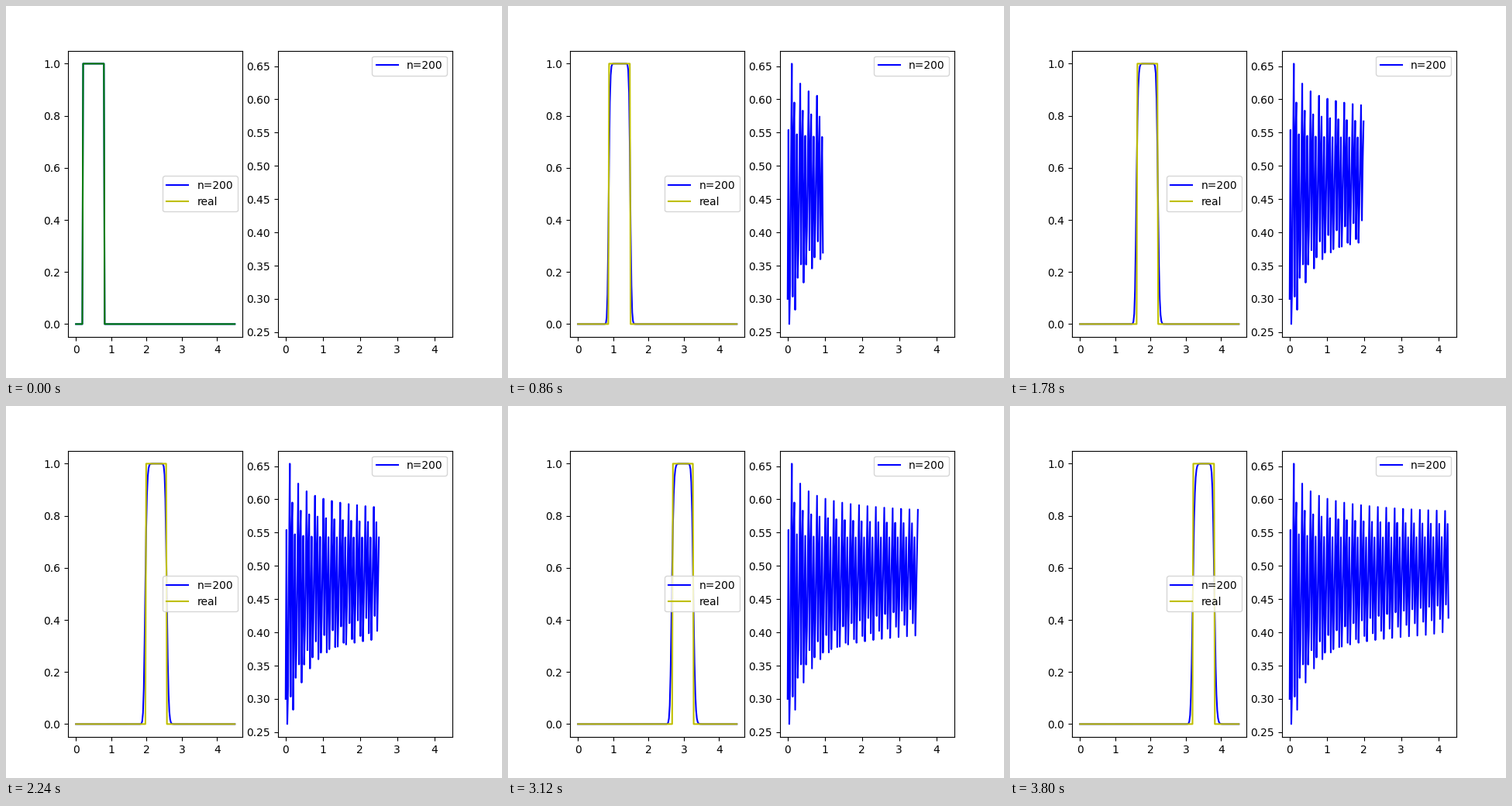
A matplotlib script that plays this animation: 640x480 px, repeating every 3.82 s.

```python
import numpy as np
import matplotlib.pyplot as plt
from matplotlib.animation import FuncAnimation

N = 200          # grid points
LENGTH = 4.5
CFL = 0.7
STEPS = 190

x = np.linspace(0, LENGTH, N)
dx = x[1] - x[0]


def pulse(step):
    """Exact square pulse after the given number of steps."""
    s = x - CFL * dx * step
    return np.where((s >= 0.2) & (s <= 0.8), 1.0, 0.0)


def advance(u):
    """One advection step, second order with the van Leer limiter."""
    d = np.diff(np.pad(u, 1, mode="edge"))
    back, ahead = d[:-1], d[1:]
    prod = back * ahead
    same_sign = prod > 0
    total = np.where(same_sign, back + ahead, 1.0)
    slope = np.where(same_sign, 2 * prod / total, 0.0)
    face = u + 0.5 * (1 - CFL) * slope
    new = u.copy()
    new[1:] -= CFL * np.diff(face)
    return new


states = [pulse(0)]
for _ in range(STEPS):
    states.append(advance(states[-1]))
error = np.array([np.abs(states[k] - pulse(k)).max()
                  for k in range(1, STEPS + 1)])
times = dx * np.arange(STEPS)

fig, (ax_wave, ax_err) = plt.subplots(1, 2, figsize=(6.4, 4.8), dpi=100)

wave, = ax_wave.plot(x, states[0], "b", label="n=200")
real, = ax_wave.plot(x, pulse(0), "y", label="real")
start, = ax_wave.plot(x, states[0], "g")
ax_wave.legend(loc="center right")

err, = ax_err.plot(times, error, "b", label="n=200")
ax_err.legend(loc="upper right")

# Keep the limits that fit the complete data.
for ax in (ax_wave, ax_err):
    ax.set_xlim(ax.get_xlim())
    ax.set_ylim(ax.get_ylim())


def draw(k):
    wave.set_ydata(states[k])
    real.set_ydata(pulse(k))
    real.set_visible(k > 0)
    start.set_visible(k == 0)
    err.set_data(times[:k], error[:k])
    return wave, real, start, err


anim = FuncAnimation(fig, draw, frames=STEPS + 1, interval=20,
                     init_func=lambda: draw(0), repeat=True)
plt.show()
```
